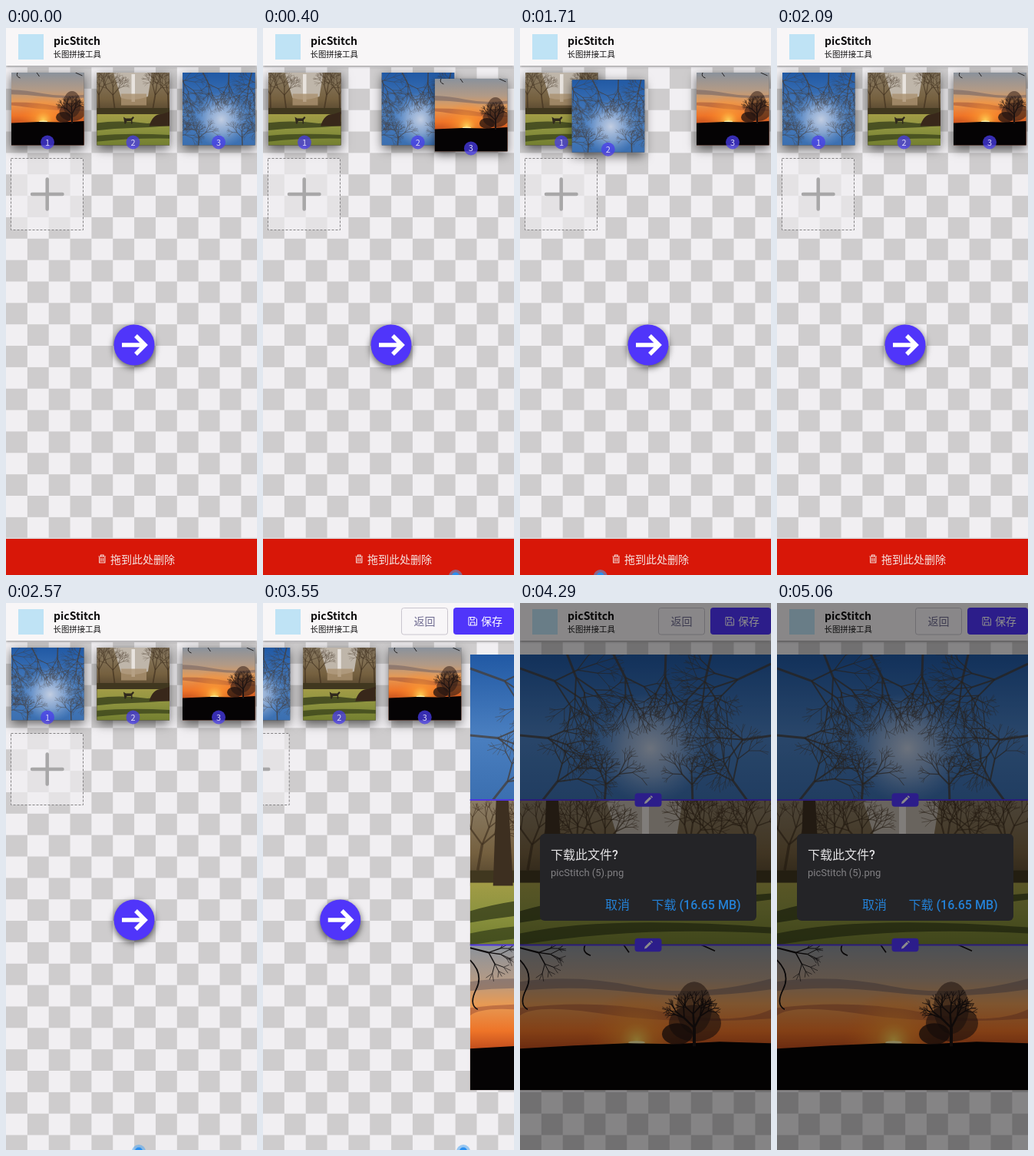
Recreate the animation shown at these times as an HTML page with a canvas. Size 327 by 711 pixels, loop 5.09 s.

```html
<!DOCTYPE html>
<html lang="zh">
<head>
<meta charset="utf-8">
<title>picStitch</title>
<style>
html, body { margin: 0; width: 100%; height: 100%; overflow: hidden; background: #f1eff2 }
canvas { display: block; width: 327px; height: 711px }
</style>
</head>
<body>
<canvas id="stage"></canvas>
<script>
const W = 327, H = 711, LOOP = 5090, TILE = 94.5;
const VIOLET = '#5035fa', CJK = '"Noto Sans CJK SC", "Noto Sans CJK", sans-serif';
const canvas = document.getElementById('stage'), c = canvas.getContext('2d');
const dpr = window.devicePixelRatio || 1;
canvas.width = W * dpr;
canvas.height = H * dpr;

// Linear keyframes given as time, value, time, value, ...
function track(t, ...k) {
  if (t <= k[0]) return k[1];
  for (let i = 2; i < k.length; i += 2)
    if (t < k[i]) return k[i - 1] + (k[i + 1] - k[i - 1]) * (t - k[i - 2]) / (k[i] - k[i - 2]);
  return k[k.length - 1];
}
const smooth = p => p * p * (3 - 2 * p);

function group(fn) { c.save(); fn(); c.restore(); }
function rect(x, y, w, h, fill) { c.fillStyle = fill; c.fillRect(x, y, w, h); }
function round(x, y, w, h, r, fill, line) {
  c.beginPath();
  c.roundRect(x, y, w, h, r);
  c.fillStyle = fill;
  c.fill();
  if (line) { c.strokeStyle = line; c.lineWidth = 1; c.stroke(); }
}
function oval(x, y, rx, ry, fill) {
  c.beginPath();
  c.ellipse(x, y, rx, ry, 0, 0, 7);
  c.fillStyle = fill;
  c.fill();
}
function shape(path, fill) { c.fillStyle = fill; c.fill(new Path2D(path)); }
function line(path, color, width) {
  c.strokeStyle = color;
  c.lineWidth = width;
  c.stroke(new Path2D(path));
}
function text(s, x, y, font, color, align = 'left') {
  c.font = font;
  c.fillStyle = color;
  c.textAlign = align;
  c.fillText(s, x, y);
}
function shadow(color, blur, dy) {
  c.shadowColor = color;
  c.shadowBlur = blur * dpr;
  c.shadowOffsetY = dy * dpr;
}
function fade(g, ...stops) {
  for (let i = 0; i < stops.length; i += 2) g.addColorStop(stops[i], stops[i + 1]);
  return g;
}
const down = (h, ...stops) => fade(c.createLinearGradient(0, 0, 0, h), ...stops);
function glow(x, y, r, ...stops) {
  rect(0, 0, W, 189, fade(c.createRadialGradient(x, y, 0, x, y, r), ...stops));
}

let seed;
const rnd = () => (seed = seed * 16807 % 2147483647) / 2147483647;
function branch(x, y, angle, len, width, depth, color) {
  const x2 = x + Math.cos(angle) * len, y2 = y + Math.sin(angle) * len;
  line(`M${x} ${y}L${x2} ${y2}`, color, width);
  if (!depth) return;
  for (const turn of [-0.55, 0.1, 0.6])
    branch(x2, y2, angle + turn + (rnd() - 0.5) * 0.5, len * (0.6 + rnd() * 0.25),
      width * 0.65, depth - 1, color);
}

// Simplified scenes, each 327 x 189
function sky() {
  rect(0, 0, W, 189, down(189, 0, '#2159a4', 0.55, '#4a7fc0', 1, '#3b6fb0'));
  glow(170, 122, 72, 0, 'rgba(208,215,230,.9)', 0.5, 'rgba(175,193,222,.6)', 1, 'rgba(130,165,215,0)');
  seed = 71;
  const twig = 'rgba(70,60,54,.75)';
  for (const [x, y, a, len] of [[0, 18, 0.35, 48], [0, 105, 0.1, 36], [25, 195, -0.9, 38],
    [60, -4, 1.2, 36], [120, -4, 1.1, 38], [327, 12, 2.7, 48], [190, -4, 1.6, 32],
    [250, -4, 1.8, 40], [330, 105, 3, 40], [300, 195, -2.2, 38], [110, 195, -1.5, 26], [225, 195, -1.6, 26]])
    branch(x, y, a, len, 3, 4, twig);
}
function park() {
  rect(0, 0, W, 189, down(115, 0, '#8b7d66', 0.6, '#75603f', 1, '#4a3d28'));
  shape('M112 0H212L202 62Q165 76 132 66Z', '#bfb6aa');
  rect(159, 4, 9, 72, '#e8e3de');
  rect(132, 55, 66, 30, 'rgba(170,145,112,.8)');
  rect(0, 92, W, 20, '#40371f');
  rect(0, 108, W, 81, down(189, 0.57, '#a29c46', 0.75, '#8f9440', 1, '#737f30'));
  seed = 19;
  for (const [x, a] of [[10, -1.4], [75, -1.6], [115, -1.7], [215, -1.4], [255, -1.6], [300, -1.6]])
    branch(x, 92, a, 34, 3.5, 4, 'rgba(62,46,30,.65)');
  shape('M34 0H50L56 112H30Z', '#3d2f20');
  shape('M0 145Q90 118 200 132L327 122V130Q240 142 160 144T0 160Z', 'rgba(50,58,24,.75)');
  shape('M0 174Q110 150 327 166V174Q150 164 0 189Z', 'rgba(45,54,22,.65)');
  shape('M205 139Q215 106 238 108L262 100 270 139Z', '#38271a');
  shape('M138 115L144 119H158L163 114 166 117 161 123V133H158V126H147L144 133H141Z', '#30291d');
}
function sunset() {
  rect(0, 0, W, 189, down(140, 0, '#8a929c', 0.32, '#b29a86', 0.55, '#e69a55', 0.8, '#ee7428', 1, '#b9461b'));
  shape('M0 48Q70 38 150 54T327 44V58Q230 72 150 62T0 60Z', 'rgba(112,98,99,.55)');
  shape('M0 82Q100 70 190 88T327 84V96Q200 104 110 90T0 92Z', 'rgba(160,83,55,.55)');
  glow(152, 124, 65, 0, 'rgba(255,216,90,.95)', 0.35, 'rgba(255,160,50,.55)', 1, 'rgba(255,120,30,0)');
  oval(152, 127, 11, 2, '#fff0a8');
  shape('M0 135L70 131 140 128 200 129 260 126 327 128V189H0Z', '#050304');
  oval(227, 82, 23, 34, 'rgba(52,32,24,.55)');
  oval(228, 102, 34, 24, 'rgba(40,24,20,.6)');
  oval(205, 116, 20, 14, 'rgba(28,17,15,.75)');
  seed = 5;
  branch(227, 132, -1.57, 24, 4, 4, '#1b1211');
  branch(0, 4, 0.25, 25, 2.2, 3, '#100d0e');
  line('M0 20Q18 38 8 58T10 84M85 0Q80 10 92 14M135 0L142 10M236 0L254 8', '#100d0e', 1.7);
}

function photo(scene, x, y, w, h) {
  group(() => {
    c.beginPath();
    c.rect(x, y, w, h);
    c.clip();
    c.translate(x + w / 2, y);
    c.scale(h / 189, h / 189);
    c.translate(-W / 2, 0);
    scene();
  });
}

function checker() {
  const s = 27.85;
  rect(0, 0, W, H, '#f1eff2');
  for (let j = 0; j < 24; j++)
    for (let i = 1 - j % 2; i < 12; i += 2) rect(i * s, 51 + j * s, s, s, '#cecccd');
}

function header(buttons) {
  group(() => {
    shadow('rgba(0,0,0,.45)', 3, 1);
    rect(0, 0, W, 49, '#f8f6f7');
  });
  rect(16, 8, 33, 33, '#bfe3f5');
  text('picStitch', 62, 22, `bold 14px ${CJK}`, '#0c0b0c');
  text('长图拼接工具', 61.5, 38, `10.4px ${CJK}`, '#151415');
  if (!buttons) return;
  round(180.5, 6.5, 60, 34.5, 3, '#f8f6f8', '#c9c5ce');
  text('返回', 210.5, 29, `14px ${CJK}`, '#706c92', 'center');
  round(248, 6, 79, 35, 4, VIOLET);
  line('M268 18.5H276L278.5 21V29H268ZM270.5 18.5V22H275V18.5M270.5 29V25H276V29', '#fff', 1);
  text('保存', 284, 29, `14px ${CJK}`, '#fff');
}

function tiles(t) {
  const list = [
    { scene: park, y: 58, x: track(t, 180, 118.5, 300, 7, 1790, 7, 1910, 118.5) },
    { scene: sunset, y: track(t, 60, 58, 150, 70, 400, 66, 480, 58), x: track(t, 60, 7, 420, 236, 480, 230) },
    { scene: sky, y: track(t, 1480, 58, 1580, 68, 1930, 66, 2050, 58),
      x: track(t, 320, 230, 440, 118.5, 1480, 118.5, 1710, 68, 1930, 10, 2050, 7) }
  ];
  if (t < 600) list.push(list.splice(1, 1)[0]);
  for (const { scene, x, y } of list) {
    group(() => {
      shadow('rgba(0,0,0,.6)', 13, 4);
      rect(x, y, TILE, TILE, '#555');
    });
    photo(scene, x, y, TILE, TILE);
    const rank = 1 + list.filter(o => o.x < x).length;
    oval(x + 47, y + 90.5, 9, 9, 'rgba(72,60,235,.75)');
    text(rank, x + 47, y + 94.5, `11px ${CJK}`, '#d9d6f5', 'center');
  }
}

function picker(t) {
  group(() => {
    rect(6.5, 169.5, 94, 93, 'rgba(240,239,241,.65)');
    c.strokeStyle = '#858385';
    c.lineWidth = 1;
    c.setLineDash([3, 2]);
    c.strokeRect(6.5, 169.5, 94, 93);
  });
  c.lineCap = 'round';
  line('M34 216H73.5M53.7 196.5V235.5', '#a8a7a8', 4.5);
  c.lineCap = 'butt';
  tiles(t);
  group(() => {
    shadow('rgba(0,0,0,.65)', 9, 3);
    oval(167, 412, 26.5, 26.5, VIOLET);
  });
  line('M151 412H181M169 400L181 412L169 424', '#fff', 5.5);
}

function result(t) {
  [sky, park, sunset].forEach((scene, i) => photo(scene, 0, 67 + i * 188.6, W, 189));
  const pop = track(t, 3660, 0, 3790, 1.1, 3920, 1);
  for (const y of [256, 444.5]) {
    rect(0, y - 1, W, 2, '#4e35dc');
    group(() => {
      c.translate(167, y);
      c.scale(pop, pop);
      round(-17.5, -8.7, 35, 17.4, 4, VIOLET);
      shape('M-5 5L-4.3 2.2L2 -4.1L4.2 -1.9L-2.2 4.3ZM2.7 -4.8L3.9 -5.8L6 -3.7L5 -2.6Z', '#fff');
    });
  }
}

function deleteBar(offset) {
  if (offset >= 49) return;
  group(() => {
    c.translate(0, offset);
    rect(0, 662.5, W, 1.5, '#dad7d9');
    rect(0, 664, W, 47, '#d81708');
    line('M120.5 687H130M123.5 687V685H127V687M121.7 688V695H128.8V688M124 689V693.5M126.5 689V693.5', '#f4dfdc', 1.2);
    text('拖到此处删除', 136, 695.5, `14px ${CJK}`, '#f6e6e3');
  });
}

function touch(t) {
  const at = (from, to) => t >= from && t < to;
  let x;
  if (at(60, 480)) x = track(t, 60, 34, 420, 263, 480, 257);
  else if (at(950, 1050)) x = 34;
  else if (at(1440, 2050)) x = track(t, 1480, 155, 1710, 105, 1930, 47);
  else if (at(2500, 2640)) x = 173;
  else if (at(3510, 3640)) x = 261;
  else return;
  oval(x, 713, 9, 9, 'rgba(80,165,240,.55)');
  oval(x, 712.5, 5, 5, '#2a8ff0');
}

function dialog(t) {
  const p = track(t, 3725, 0, 3845, 1);
  if (!p) return;
  rect(0, 0, W, H, `rgba(0,0,0,${p * 0.45})`);
  group(() => {
    c.globalAlpha = Math.min(1, p * 1.5);
    round(26, 300, 282, 113, 6, '#242427');
    text('下载此文件?', 40, 332.5, `500 16px Roboto, ${CJK}`, '#e4e3e5');
    text('picStitch (5).png', 40, 355, '13px Roboto, sans-serif', '#828184');
    text('取消', 111, 398, `16px ${CJK}`, '#2480d5');
    text('下载 (16.65 MB)', 171.5, 398, `500 16px Roboto, ${CJK}`, '#2480d5');
  });
}

function draw(t) {
  c.setTransform(dpr, 0, 0, dpr, 0, 0);
  checker();
  const shift = 336 * smooth(track(t, 3502, 0, 3674, 1));
  if (shift < 336) group(() => { c.translate(-shift, 0); picker(t); });
  if (shift > 0) group(() => { c.translate(336 - shift, 0); result(t); });
  header(t >= 3480);
  deleteBar(track(t, 2150, 0, 2300, 49));
  touch(t);
  dialog(t);
}

const start = performance.now();
function tick() {
  draw((performance.now() - start) % LOOP);
  requestAnimationFrame(tick);
}
tick();
</script>
</body>
</html>
```
